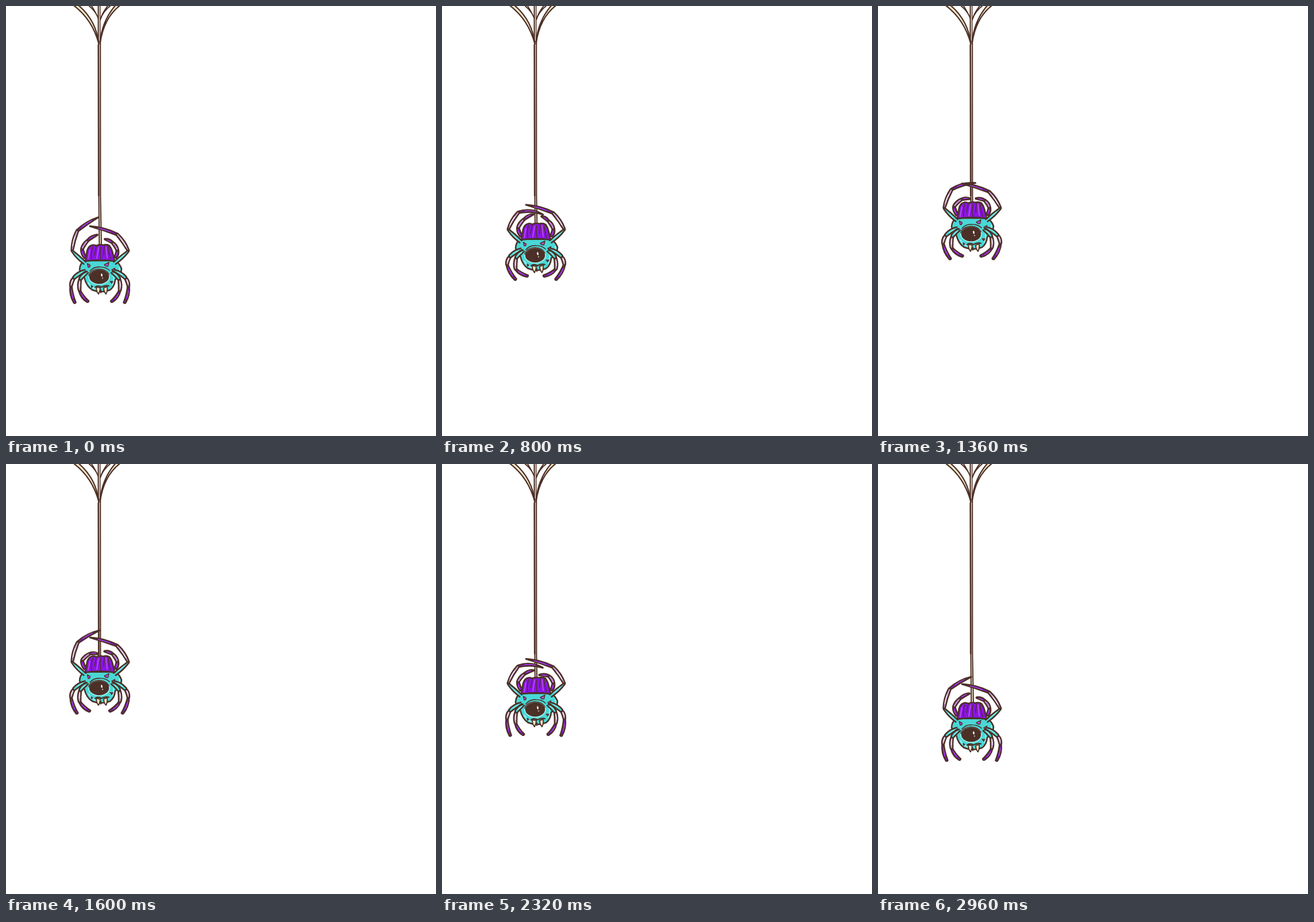
An HTML page with a canvas that plays this animation: 748x748 px, repeating every 3 s.

```html
<!DOCTYPE html>
<html lang="en">
<head>
<meta charset="utf-8">
<title>Hanging spider</title>
<style>
html, body { margin: 0; width: 100%; height: 100%; overflow: hidden; background: #fff; }
canvas { display: block; }
</style>
</head>
<body>
<canvas id="stage" width="748" height="748"></canvas>
<script>
const ctx = document.getElementById('stage').getContext('2d');
const LOOP = 3000, STEP = 40, RISE = 1700, LIFT = 82;
const INK = '#4c3027', TEAL = '#49d8d6', PALE = '#a5f1ee', PURPLE = '#8a14e4',
      PINK = '#c04ef4', LILAC = '#d8aeea', CREAM = '#f3e4c6';

// pose curves, sampled at TIMES and joined smoothly around the loop
const TIMES = [0, 400, 800, 1120, 1600, 2320, 2960];
const REACH = [0, 0.55, 1, 0.95, 0.1, 0.95, 0.09];
const LEFT_ARM = [0, 0.6, 0.1, 0.5, 1, 0.35, 0.1];
const RIGHT_ARM = [0.25, 1, 0, 0.75, 0.4, 0.8, 0.35];
const CURL = [0, 0.5, 1, 0.95, 0.45, -0.1, 0];

const mix = (a, b, k) => a + (b - a) * k;
const mixPt = (a, b, k) => [mix(a[0], b[0], k), mix(a[1], b[1], k)];
const same = p => p;
const flip = p => [326 - p[0], p[1]];

function sample(vals, t) {
  const n = TIMES.length;
  const time = i => TIMES[(i + n) % n] + LOOP * Math.floor(i / n);
  const val = i => vals[(i + n) % n];
  const slope = i => (val(i + 1) - val(i - 1)) / (time(i + 1) - time(i - 1));
  let i = n - 1;
  while (TIMES[i] > t) i--;
  const d = time(i + 1) - time(i), k = (t - time(i)) / d, k2 = k * k, k3 = k2 * k;
  return (2 * k3 - 3 * k2 + 1) * val(i) + (k3 - 2 * k2 + k) * d * slope(i)
       + (3 * k2 - 2 * k3) * val(i + 1) + (k3 - k2) * d * slope(i + 1);
}

function lift(t) {
  const k = t < RISE ? t / RISE : 1 - (t - RISE) / (LOOP - RISE);
  return -LIFT * (1 - Math.cos(Math.PI * k)) / 2;
}

function blink(t) {
  return Math.max(0, 1 - Math.abs(t - 400) / 140);
}

function paint(d, fill, line, width = 2.4) {
  const p = new Path2D(d);
  if (fill) { ctx.fillStyle = fill; ctx.fill(p); }
  if (line) { ctx.strokeStyle = line; ctx.lineWidth = width; ctx.stroke(p); }
}

// curved limb piece from a to b, left open at a when it grows out of the body
function limb(a, b, w0, w1, fill, shine, bend = 0, open = false) {
  const len = Math.hypot(b[0] - a[0], b[1] - a[1]), mid = len / 2;
  const m = Math.max(w0, w1) / 2 + 1.2, c = 2 * bend;
  ctx.save();
  ctx.translate(a[0], a[1]);
  ctx.rotate(Math.atan2(b[1] - a[1], b[0] - a[0]));
  paint(`M0 ${-w0 / 2}Q${mid} ${c - m} ${len} ${-w1 / 2}Q${len + w1 / 2} 0 ${len} ${w1 / 2}`
    + `Q${mid} ${c + m} 0 ${w0 / 2}${open ? '' : 'Z'}`, fill, INK, 2.6);
  paint(`M${len * 0.25} ${bend * 0.75 - 0.5}Q${mid} ${bend * 1.2 - 0.7} ${len * 0.7} ${bend * 0.8 - 0.5}`, null, shine, 1);
  ctx.restore();
}

function web() {
  paint('M141 -3Q157 9 161.5 24Q157 12 147 -3', CREAM, INK, 1.9);
  paint('M185 -3Q169 8 164 24Q167 12 179 -3', CREAM, INK, 1.9);
  paint('M162 -3V60', null, INK, 5);
  paint('M162.4 -3V60', null, CREAM, 1.5);
  paint('M115 -3Q150 22 161.5 66Q157 24 124 -3', CREAM, INK, 2.2);
  paint('M201 -3Q170 19 163.5 66Q166 26 192 -3', CREAM, INK, 2.2);
}

function thread(end) {
  ctx.save();
  ctx.beginPath();
  ctx.rect(150, 50, 30, end - 50);
  ctx.clip();
  paint('M160.9 56L161.4 330L162.4 430H166.2L164.4 330L164.2 56Z', CREAM, INK, 2);
  paint('M160.7 68L161.2 330', null, INK, 2.6);
  ctx.restore();
}

function backArms(t) {
  const l = sample(LEFT_ARM, t), r = sample(RIGHT_ARM, t);
  const arm = (tip, knee, elbow, root, out) => {
    limb(root, elbow, 4, 4, PURPLE, PINK, out);
    limb(elbow, knee, 4, 3.5, LILAC, PINK, out);
    limb(knee, tip, 3.5, 1.5, PURPLE, PINK, out);
  };
  arm(mixPt([159, 398], [161, 412], l), mixPt([142, 408], [146, 411], l), [132, 423], [138, 438], -1);
  arm(mixPt([173, 403], [168, 413], r), mixPt([185, 411], [186, 413], r), [194, 425], [190, 438], 1);
}

function frontArms(t) {
  const u = sample(REACH, t), ang = mix(-32.7, 5.4, u) * Math.PI / 180;
  const knee = mixPt([124, 391], [133, 396], u);
  const tip = [knee[0] + 43 * Math.cos(ang), knee[1] + 43 * Math.sin(ang)];
  const arm = (root, elbow, knee, tip, out, arch) => {
    limb(knee, tip, 3.5, 0.5, PURPLE, PINK, out * arch);
    limb(elbow, knee, 3, 4, LILAC, '#fff', out * 1.5);
    limb(root, elbow, 5, 2.5, TEAL, PALE, out * 0.5, true);
  };
  arm([137, 447], [115, 426], knee, tip, -1, mix(1.5, 4, u));
  arm([189, 447], [213, 426], [193, 397], [146, 383], 1, 1.5);
}

function lowerLegs(t) {
  const s = sample(CURL, t);
  // root, knee, ankle, foot length, rest angle, swing
  const legs = [
    [[138, 460], [118, 473], [113, 487], 30, 77, 17],
    [[142, 463], [129, 475], [128, 495], 24, 53, 23]
  ];
  for (const [side, out] of [[same, 1], [flip, -1]]) {
    for (const [root, knee, ankle, len, rest, swing] of legs) {
      const a = (rest - swing * s) * Math.PI / 180;
      const foot = [ankle[0] + len * Math.cos(a), ankle[1] + len * Math.sin(a)];
      limb(side(ankle), side(foot), 3, 3.6, PURPLE, PINK, out * 1.8);
      limb(side(knee), side(ankle), 4, 4, LILAC, '#fff', out);
      limb(side(root), side(knee), 3, 5, TEAL, PALE, out * 1.2, true);
    }
  }
}

function torso() {
  paint('M135 443Q128 450 128 459Q132 466 136 472Q140 488 150 494Q165 500 181 494Q189 488 190 476Q201 468 201 457Q198 448 190 443Z', TEAL, INK, 2.6);
  paint('M143 481Q150 492 160 494M197 455Q199 460 195 464', null, PALE, 1.8);
  paint('M186 467Q189 475 185 485', null, PALE, 1.5);
}

function cap() {
  paint('M138 444L141 426Q143 419 147 417Q152 414 157 417Q163 414 169 416Q175 414 180 417Q184 422 186 431L189 444Q164 440 138 444Z', PURPLE, INK, 2.7);
  paint('M146 424L143 440M161 420L158 439M174 419L176 438', null, PINK, 1.7);
  paint('M151 419Q147 429 149 440M157 418L154 433M165 419Q163 430 165 440M171 417L170 433M178 418Q178 430 182 440', null, INK, 1.5);
}

function eyelets() {
  paint('M141.5 448L146.5 451Q146 455 143 454.5Z', PINK, INK, 1.5);
  paint('M179 446L171 450Q173 453.5 177.5 452.5Z', PINK, INK, 1.5);
  paint('M189.5 456L184 459Q186 461.5 188.5 459.5Z', PINK, INK, 1.5);
  paint('M181 479L186 479L184 482.5ZM148 486L151 488L149 490Z', PURPLE, INK, 1.2);
}

function oval(y, rx, ry, fill, line, width) {
  ctx.beginPath();
  ctx.ellipse(162, y, rx, ry, 0, 0, 7);
  ctx.fillStyle = fill;
  ctx.fill();
  if (line) { ctx.strokeStyle = line; ctx.lineWidth = width; ctx.stroke(); }
}

function bigEye(t) {
  const b = blink(t);
  paint('M146 461Q153 453 164 454Q174 454 180 460', null, INK, 1.6);
  oval(471, 18.8, 14.2, PALE);
  oval(471, 17.2, 12.5, INK);
  ctx.fillStyle = '#fff';
  ctx.beginPath();
  ctx.ellipse(166.5, 468, 1.3, 2.8, -0.15, 0, 7);
  ctx.ellipse(168, 473.5, 0.8, 1.1, 0, 0, 7);
  ctx.fill();
  if (b > 0) {
    ctx.save();
    ctx.beginPath();
    ctx.ellipse(162, 471, 18.8, 14, 0, 0, 7);
    ctx.clip();
    oval(mix(444, 465.5, b), 19, 13, TEAL, INK, 2);
    ctx.restore();
  }
  paint('M144 469Q147 458 162 457.5Q175 458 179 467', null, INK, 1.6);
}

function mouth() {
  paint('M155 489Q160 485 166 489Q173 485 179 487', null, INK, 2.2);
  paint('M157 489Q157 497 161 501Q164 496 164 490Z', CREAM, INK, 1.9);
  paint('M170 490Q170 497 174 501Q177 495 176 488Z', CREAM, INK, 1.9);
  paint('M165 494L165 499', null, INK, 1.8);
}

function draw(t) {
  const dy = lift(t);
  ctx.fillStyle = '#fff';
  ctx.fillRect(0, 0, 748, 748);
  ctx.lineJoin = ctx.lineCap = 'round';
  thread(420 + dy);
  web();
  ctx.save();
  ctx.translate(0, dy);
  backArms(t);
  torso();
  lowerLegs(t);
  frontArms(t);
  cap();
  eyelets();
  bigEye(t);
  mouth();
  ctx.restore();
}

const start = performance.now();
function tick() {
  const t = (performance.now() - start) % LOOP;
  draw(Math.floor(t / STEP) * STEP);
  requestAnimationFrame(tick);
}
tick();
</script>
</body>
</html>
```
